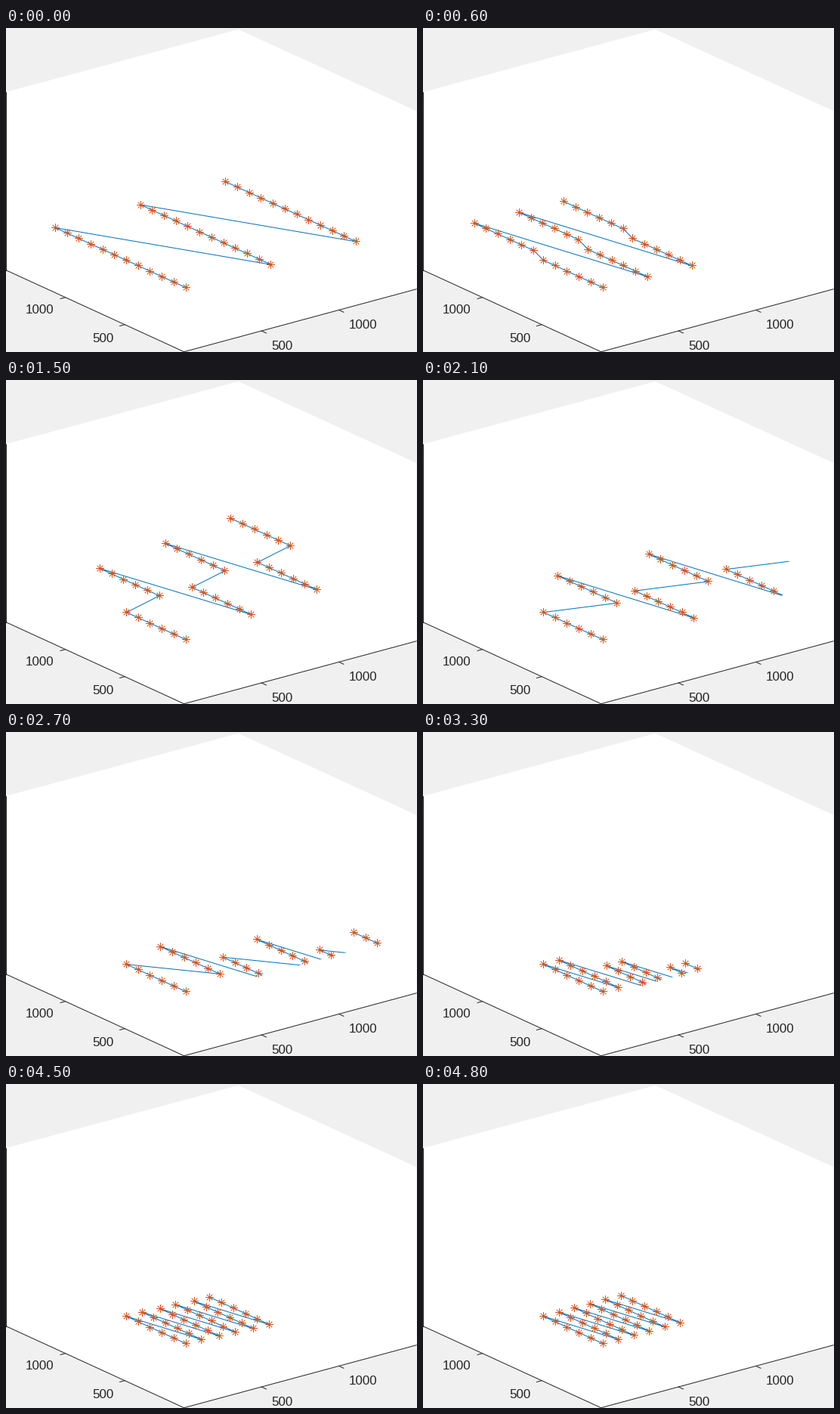
These frames come from a looping animation (544x429 px, 5.1 s). A matplotlib script:

```python
import numpy as np
import matplotlib.pyplot as plt
from matplotlib.animation import FuncAnimation
from matplotlib.patches import Polygon

W, H, DPI = 544, 429, 100
PX = 72 / DPI
SIZE = 1500
INK, BLUE, ORANGE = "#262626", "#0072BD", "#D95319"


def project(x, y, z=0):
    """Cube coordinates (z from -500 to 1000) to stage pixels."""
    x, y = np.asarray(x, float), np.asarray(y, float)
    return (235.65 + 0.205 * x - 0.157 * y,
            428.7 - 0.0553 * x - 0.072 * y - 0.1573 * (z + 500))


# Six rows of six markers. PAIR is the shift from one pair of rows to the
# next, FOLD the shift from the first row of a pair to the second.
PAIR = [(550, 0), (278, -14), (336, 49), (413, 87), (488, 85), (543, 42),
        (562, -36), (538, -134), (456, -219), (312, -240), (243, -216)]
FOLD = [(0, 600), (48, 645), (129, 679), (205, 651), (281, 590), (347, 498),
        (382, 379), (362, 250), (295, 97), (183, -2), (100, 0)]
PAIR_GOAL = np.array([200.0, 0.0])
SPEED = 50


def pair_shift(step):
    last = len(PAIR) - 1
    start = np.array(PAIR[min(step, last)], float)
    if step <= last:
        return start
    # final approach: straight to the goal at constant speed
    way = PAIR_GOAL - start
    return start + way * min(1, SPEED * (step - last) / np.hypot(*way))


def fold_shift(step):
    return np.array(FOLD[min(step, len(FOLD) - 1)], float)


def markers(step):
    row = np.column_stack([np.full(6, 50.0), 50 + 100.0 * np.arange(6)])
    pair, fold = pair_shift(step), fold_shift(step)
    return np.vstack([row + i * pair + j * fold
                      for i in range(3) for j in range(2)])


# eight-armed star as four strokes, separated by gaps
ARM, DIAG, GAP = 5.5, 3.8, np.nan
STAR_X = np.array([-ARM, ARM, GAP, 0, 0, GAP,
                   -DIAG, DIAG, GAP, -DIAG, DIAG, GAP])
STAR_Y = np.array([0, 0, GAP, -ARM, ARM, GAP,
                   -DIAG, DIAG, GAP, DIAG, -DIAG, GAP])


def star_strokes(x, y):
    """Strokes of all stars, each centred on a whole pixel."""
    cx, cy = np.floor(x) + 0.5, np.floor(y) + 0.5
    return (np.add.outer(cx, STAR_X).ravel(),
            np.add.outer(cy, STAR_Y).ravel())


fig = plt.figure(figsize=(W / DPI, H / DPI), dpi=DPI, facecolor="#F0F0F0")
ax = fig.add_axes([0, 0, 1, 1])
ax.set_xlim(0, W)
ax.set_ylim(H, 0)
ax.axis("off")

# white cube silhouette
corners = [(0, 0, -500), (SIZE, 0, -500), (SIZE, 0, 1000),
           (SIZE, SIZE, 1000), (0, SIZE, 1000), (0, SIZE, -500)]
ax.add_patch(Polygon([project(*c) for c in corners], fc="white", ec="none"))


def stroke(a, b):
    ax.plot([a[0], b[0]], [a[1], b[1]], color=INK, lw=PX)


origin = project(0, 0, -500)
left = project(0, SIZE, -500)
stroke(origin, project(SIZE, 0, -500))
stroke(origin, left)
stroke(left, project(0, SIZE, 1000))

for value in (500, 1000):
    stroke(project(value, 0, -500), project(value, -40, -500))
    stroke(project(0, value, -500), project(-32, value, -500))


def label(x, y, text):
    ax.text(x, y, text, color=INK, family="Liberation Sans",
            fontsize=17 * PX, ha="center", va="baseline")


label(365, 425.5, "500")
label(473, 398.5, "1000")
label(128, 415.5, "500")
label(45, 378.5, "1000")

# the path is cut where it leaves the cube
floor = Polygon(np.column_stack(project([0, SIZE, SIZE, 0],
                                        [0, 0, SIZE, SIZE])),
                transform=ax.transData)
path, = ax.plot([], [], color=BLUE, lw=PX)
path.set_clip_path(floor)
stars, = ax.plot([], [], color=ORANGE, lw=PX, solid_capstyle="butt",
                 snap=False)


def draw(n):
    pts = markers(max(n - 1, 0))
    inside = np.all((pts >= 0) & (pts <= SIZE), axis=1)
    path.set_data(*project(*pts.T))
    stars.set_data(*star_strokes(*project(*pts[inside].T)))
    return path, stars


anim = FuncAnimation(fig, draw, frames=17, interval=300, repeat=True,
                     repeat_delay=0, blit=False)
plt.show()
```
